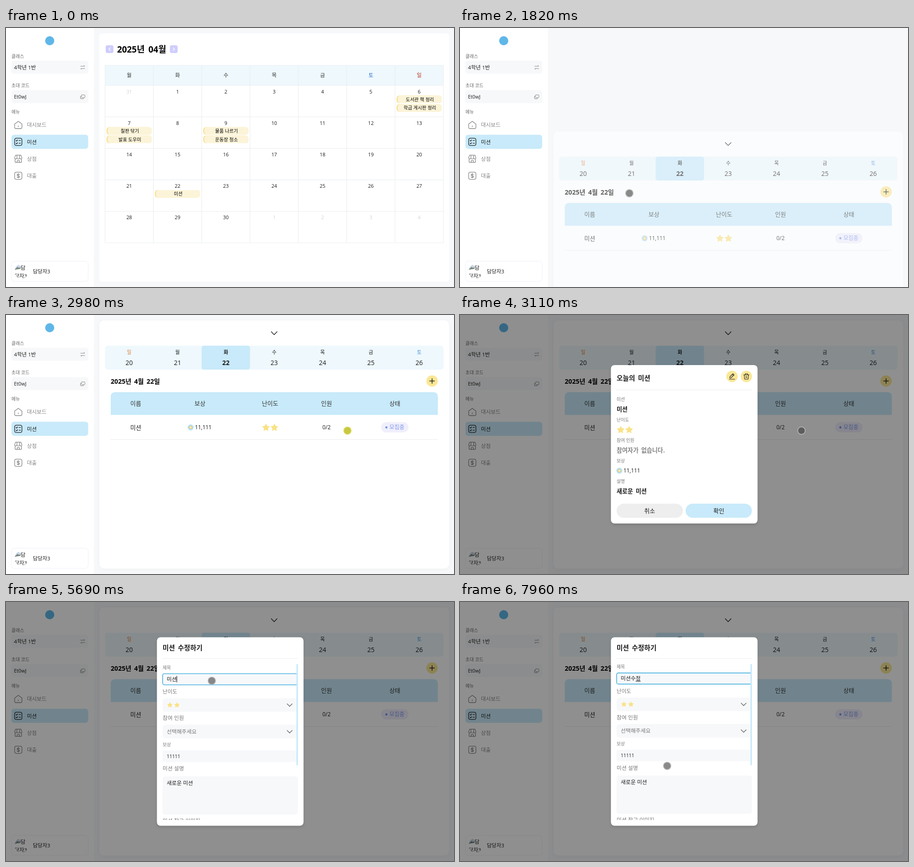
Recreate the animation shown at these times as an HTML page. Size 984 by 569 pixels, loop 8 s.

```html
<!DOCTYPE html>
<html lang="ko">
<head>
<meta charset="utf-8">
<title>미션 캘린더</title>
<style>
html, body { margin: 0; width: 100%; height: 100%; overflow: hidden; background: #f7f8fa; }
svg { display: block; width: 984px; height: 569px; }
text { font-family: 'Open Sans', 'Noto Sans CJK KR', 'Noto Sans CJK', 'Noto Sans', sans-serif; white-space: pre; }
.bold { font-weight: 700; word-spacing: .18em; }
</style>
</head>
<body>
<svg id="stage" viewBox="0 0 984 569" xmlns="http://www.w3.org/2000/svg"></svg>
<script>
const LOOP = 8000;
const SKY = '#c8eafa', PALE = '#eef8fd', FIELD = '#f7f8fa', YELLOW = '#fbe796', GRAY = '#858585', INK = '#1c1c1c';
const COL_X = 217.5, COL_W = 106.17;

// Text is placed by its vertical centre.
const text = (x, cy, str, size, { fill = INK, bold, mid } = {}) =>
  `<text x="${x}" y="${cy + size * 0.37}" font-size="${size}" fill="${fill}"` +
  `${bold ? ' class="bold"' : ''}${mid ? ' text-anchor="middle"' : ''}>${str}</text>`;
const rect = (x, y, w, h, r, fill, extra = '') =>
  `<rect x="${x}" y="${y}" width="${w}" height="${h}" rx="${r}" fill="${fill}" ${extra}/>`;
const circle = (x, y, r, fill) => `<circle cx="${x}" cy="${y}" r="${r}" fill="${fill}"/>`;
const line = (d, color = INK, width = 1.3) =>
  `<path d="${d}" fill="none" stroke="${color}" stroke-width="${width}" stroke-linecap="round" stroke-linejoin="round"/>`;
const at = (x, y, content) => `<g transform="translate(${x} ${y})">${content}</g>`;
const group = (id, content) => `<g id="${id}">${content}</g>`;

function star(x, y, r) {
  const points = Array.from({ length: 10 }, (_, i) => {
    const a = i * Math.PI / 5 - Math.PI / 2, d = i % 2 ? r * 0.5 : r;
    return `${(x + d * Math.cos(a)).toFixed(2)},${(y + d * Math.sin(a)).toFixed(2)}`;
  });
  return `<polygon points="${points.join(' ')}" fill="#f9e286" stroke="#f9e286" stroke-width="1.2" stroke-linejoin="round"/>`;
}

const coin = (x, y) => circle(x, y, 6.5, '#b5dff6') +
  at(x, y, '<path d="M0-4.3 4.3 0 0 4.3-4.3 0Z" fill="#f3cd62"/><path d="M0-2 2 0 0 2-2 0Z" fill="#fff"/>');
const chevron = (x, y, w, color) => line(`M${x - w} ${y - w / 2}l${w} ${w} ${w} ${-w}`, color, 1.4);

function sidebar() {
  const icons = [
    line('M-8-2 0-8 8-2V5Q8 8 5 8H-5Q-8 8-8 5ZM0 2V4', GRAY),
    line('M-4-8H4Q8-8 8-4V4Q8 8 4 8H-4Q-8 8-8 4V-4Q-8-8-4-8ZM-5-3l1.3 1.3L-1.5-4.2M-5 3l1.3 1.3L-1.5 1.8M1.5-3H5M1.5 3H5', INK),
    line('M-6-8H6L8-2Q7 1 4.5 0L3-1Q0 2-3-1Q-7 2-8-2ZM-7 1V6Q-7 8-5 8H5Q7 8 7 6V1M-3-8V-1M3-8V-1M-2.5 8V4H2.5V8', GRAY),
    line('M-4-8H4Q8-8 8-4V4Q8 8 4 8H-4Q-8 8-8 4V-4Q-8-8-4-8ZM2.7-2.5Q2-3.8 0-3.8T-2.7-2Q-2.7-.5 0 0T2.7 2Q2.5 3.8 0 3.8T-2.7 2.5M0-5V5', GRAY)
  ];
  const menu = ['대시보드', '미션', '상점', '대출'].map((name, i) => {
    const y = 213 + i * 37.2;
    return at(27, y, icons[i]) + text(46, y, name, 11.7, { fill: i === 1 ? INK : GRAY });
  }).join('');
  const labels = [['클래스', 62], ['초대 코드', 126], ['메뉴', 184]]
    .map(([name, y]) => text(12, y, name, 10, { fill: '#666' })).join('');
  const avatar = `<g clip-path="url(#avatar)">
    <path d="M20 520h8l4 4v3l-13 5z" fill="#c8d6e8"/><path d="M19 531l6-6 4 2 3-1v3z" fill="#77877a"/>
    ${text(32, 527, '담', 11.6)}${text(18.5, 545, '당자3', 11.6)}</g>`;
  return rect(0, 0, 193, 569, 0, '#fff') + circle(96, 28, 10, '#5fb7e8') + labels +
    rect(12, 72, 168.5, 28.5, 5, FIELD) + text(17.5, 86.5, '4학년 1반', 11.6) +
    line('M164 84H173l-2-2M173 89H164l2 2', GRAY, 1) +
    rect(12, 136.5, 168.5, 28.5, 5, FIELD) + text(17.5, 151, 'Et0wJ', 10.8) +
    line('M167 147h5q1.5 0 1.5 1.5v3q0 1.5-1.5 1.5h-5q-1.5 0-1.5-1.5v-3q0-1.5 1.5-1.5M165 149.5q-1.5 0-1.5 1.5v3q0 1.5 1.5 1.5h4q1.5 0 1.5-1.5', GRAY, 1) +
    rect(12, 234.5, 168.5, 31, 6, SKY) + menu +
    rect(12, 512.5, 168.5, 44, 6, '#fff', 'stroke="#eff0f8"') + avatar + text(59, 535, '담당자3', 11.4);
}

function calendar() {
  const rowY = i => 126 + i * 69.2;
  const missions = { 6: ['도서관 책 정리', '학급 게시판 정리'], 7: ['칠판 닦기', '발표 도우미'], 9: ['물품 나르기', '운동장 청소'], 22: ['미션'] };
  const pageButton = (x, dir) => rect(x - 8.5, 38, 17, 17, 4, '#cfcdfc') +
    line(`M${x - dir * 1.5} 43.5l${dir * 3} 3 ${-dir * 3} 3`, '#fff', 1.4);
  let out = rect(205, 12, 768.5, 545, 6, '#fff') + pageButton(227.5, -1) + pageButton(368.5, 1) +
    text(244, 47, '2025년 04월', 18.9, { bold: true, fill: '#000' }) +
    rect(COL_X, 82, COL_W * 7, 44, 0, PALE);
  let grid = '';
  for (let i = 0; i < 8; i++) grid += `M${COL_X + i * COL_W} 82V472`;
  grid += `M${COL_X} 82h${COL_W * 7}`;
  for (let i = 0; i < 6; i++) grid += `M${COL_X} ${rowY(i)}h${COL_W * 7}`;
  out += line(grid, '#ebeff1', 1.2);
  [...'월화수목금토일'].forEach((day, i) => {
    out += text(COL_X + (i + 0.5) * COL_W, 104, day, 11.5, { mid: true, fill: ['#2a6fc9', '#b8301c'][i - 5] || '#333' });
  });
  for (let i = 0; i < 35; i++) {
    const x = COL_X + (i % 7) * COL_W, y = rowY(Math.floor(i / 7));
    const inMonth = i > 0 && i < 31;
    out += text(x + COL_W / 2, y + 13.7, i === 0 ? 31 : inMonth ? i : i - 30, 10.8, { mid: true, fill: inMonth ? INK : '#d3d3d3' });
    (inMonth && missions[i] || []).forEach((name, k) => {
      const top = y + 22.5 + k * 18.8;
      out += rect(x + 3.5, top, 99, 16.5, 6, '#f8dc80') + rect(x + 5.5, top, 97, 16.5, 6, '#fcf4d9') +
        text(x + 54.5, top + 8.3, name, 10.3, { mid: true, fill: '#000' });
    });
  }
  return out;
}

function week() {
  let out = rect(205, 12, 768.5, 545, 11, '#fff', 'filter="url(#soft)"') + chevron(589, 40, 6.3, INK) +
    rect(217.5, 67.5, 743.5, 52.5, 6, PALE) + rect(429.7, 67.5, 106.3, 52.5, 5, SKY);
  [...'일월화수목금토'].forEach((day, i) => {
    const x = COL_X + (i + 0.5) * COL_W, bold = i === 2;
    out += text(x, 82, day, 10.8, { mid: true, bold, fill: { 0: '#dc7e35', 6: '#438fdf' }[i] || INK }) +
      text(x, 104.5, 20 + i, 14, { mid: true, bold });
  });
  out += text(230, 146, '2025년 4월 22일', 14.15, { bold: true, fill: '#000' }) +
    circle(935.8, 145, 12.5, YELLOW) + line('M930.5 145h10.600M935.800 139.700v10.600', INK, 1.5) +
    `<path d="M230 219.5V179.5q0-10 10-10H938.5q10 0 10 10v40z" fill="${SKY}"/>`;
  [['이름', 285], ['보상', 426], ['난이도', 580], ['인원', 704], ['상태', 854]]
    .forEach(([name, x]) => { out += text(x, 194.5, name, 13, { mid: true, fill: '#333' }); });
  return out + text(285, 247, '미션', 13, { mid: true }) + coin(405.5, 247) + text(415, 247, '11,111', 11.8) +
    star(571, 247.5, 7.8) + star(589.5, 247.5, 7.8) + text(704, 247, '0/2', 12, { mid: true }) +
    rect(824, 235.5, 60, 22.5, 11.2, '#f0effc') + circle(835.5, 247, 2.4, '#7294ea') +
    text(842, 246.5, '모집중', 12, { fill: '#7d97ea' }) + line('M230 273.5H948', '#ececee', 1);
}

const dialog = (y, h, title, titleY, ruleY) =>
  rect(331.5, y, 322, h, 8, '#fff', 'filter="url(#lift)"') +
  text(344, titleY, title, 14.7, { bold: true }) + line(`M344 ${ruleY}H641`, '#ededf0', 1);

function detail() {
  const labels = ['미션', '난이도', '참여 인원', '보상', '설명']
    .map((name, i) => text(344, 185 + i * 45, name, 9.9, { fill: '#777' })).join('');
  return dialog(110, 348, '오늘의 미션', 138.5, 164.5) + labels +
    circle(597.5, 135, 12.5, YELLOW) + circle(629, 135, 12.5, YELLOW) +
    at(597.5, 135, line('M-5 3.5l.5-3L2-6 4.5-3.5-2 3ZM.5-4.5 3-2M-6 6H6', INK, 1.1)) +
    at(629, 135, line('M-6-3.5H6M-2.5-3.5V-6H2.5V-3.5M-4.7-3.5-4 5Q-4 6-3 6H3Q4 6 4 5L4.7-3.5M-1.5 0H1.5M-1.5 2.5H1.5', INK, 1.1)) +
    text(344, 207.5, '미션', 13.1, { bold: true }) + star(353, 252.5, 7.8) + star(371.5, 252.5, 7.8) +
    text(344, 297.5, '참여자가 없습니다.', 13.1, { bold: true, fill: GRAY }) +
    coin(350, 342) + text(359, 342, '11,111', 11.9) + text(344, 387.5, '새로운 미션', 13.1, { bold: true }) +
    rect(344, 414.5, 145.5, 31, 15.5, '#eee') + rect(495.5, 414.5, 145.5, 31, 15.5, SKY) +
    text(416.5, 430, '취소', 13, { mid: true }) + text(568.5, 430, '확인', 13, { mid: true });
}

function editor() {
  const label = (y, name, size = 11.9) => text(344, y, name, size, { fill: '#777' });
  const form = label(144, '제목', 9.9) + rect(344, 157.5, 297, 24.5, 4, FIELD, 'id="title" stroke-width="1.6"') +
    text(353, 169.5, '<tspan id="typed"></tspan><tspan id="composing" text-decoration="underline"></tspan>', 11.9) +
    rect(374.7, 162.5, 1, 14, 0, '#000', 'id="caret"') +
    label(197, '난이도', 11.6) + rect(344, 211.5, 297, 29.5, 6, FIELD) + star(360, 226.5, 5.2) + star(375.5, 226.5, 5.2) +
    chevron(623, 226.5, 5.5, '#666') +
    label(255, '참여 인원') + rect(344, 269.5, 297, 30, 6, FIELD) + text(353, 284.5, '선택해주세요', 11.9, { fill: '#777' }) +
    chevron(623, 285, 5.5, '#666') +
    label(313, '보상', 9.9) + rect(344, 326, 297, 25.5, 4, FIELD) + text(353, 339, '11111', 10.4) +
    label(366, '미션 설명') + rect(344, 383, 297, 84, 5, FIELD) + text(353, 397.5, '새로운 미션', 11.9) +
    label(480.5, '미션 참고 이미지');
  return dialog(77.5, 414, '미션 수정하기', 101, 124) +
    `<g clip-path="url(#form-box)">${group('form', form)}</g>` + rect(638, 136.5, 3.2, 222, 0, SKY);
}

const stage = document.getElementById('stage');
stage.innerHTML = `<defs>
  <clipPath id="avatar"><circle cx="34.5" cy="534.5" r="15.8"/></clipPath>
  <clipPath id="form-box"><rect x="343" y="136" width="298" height="343"/></clipPath>
  <filter id="soft"><feDropShadow dx="0" dy="2" stdDeviation="4" flood-opacity=".03"/></filter>
  <filter id="lift"><feDropShadow dx="0" dy="3" stdDeviation="3" flood-opacity=".14"/></filter></defs>` +
  rect(0, 0, 984, 569, 0, '#f7f8fa') + group('calendar', calendar()) + group('week', week()) + sidebar() +
  rect(0, 0, 984, 569, 0, '#000', 'id="shade" opacity=".44"') +
  group('detail', detail()) + group('editor', editor()) +
  '<circle id="cursor" r="8.2" stroke-width="1.8"/>';

const $ = id => document.getElementById(id);
const show = (id, on) => $(id).setAttribute('display', on ? 'inline' : 'none');
const within = (t, a, b) => t >= a && t < b;

// Progress from 0 to 1, held in n equal steps.
const stepped = (t, a, b, n) => Math.min(1, Math.max(0, Math.floor((t - a) / (b - a) * n + 1e-6) / n));

const moves = [
  { start: 260, end: 960, steps: 10, from: [912, 559], bend: [560, 545], to: [372, 363] },
  { start: 2440, end: 2910, steps: 6, from: [372, 363], bend: [580, 355], to: [750, 254] },
  { start: 3510, end: 4190, steps: 9, from: [750, 254], bend: [715, 268], to: [601, 138] },
  { start: 4920, end: 5550, steps: 9, from: [601, 138], bend: [510, 235], to: [452, 173] },
  { start: 6220, end: 6290, steps: 1, from: [452, 173], bend: [452, 176], to: [452, 179] },
  { start: 7750, end: 7960, steps: 3, from: [452, 179], bend: [454, 270], to: [455, 360] }
];
const clicks = [[1620, 1680], [2980, 3110], [4520, 4590], [5620, 5690]];
const syllables = [['', 'ㅅ'], ['', '수'], ['', '숮'], ['수', '저'], ['수', '정']];

function drawCursor(t) {
  const move = moves.filter(m => t >= m.start).pop();
  show('cursor', move);
  if (!move) return;
  const u = 1 - (1 - stepped(t, move.start, move.end, move.steps)) ** 2;
  const [x, y] = [0, 1].map(k => (1 - u) ** 2 * move.from[k] + 2 * u * (1 - u) * move.bend[k] + u * u * move.to[k]);
  const pressed = clicks.some(([a, b]) => within(t, a, b));
  const cursor = $('cursor');
  cursor.setAttribute('cx', x);
  cursor.setAttribute('cy', y);
  cursor.setAttribute('fill', pressed ? 'rgba(190,190,30,.85)' : 'rgba(60,60,60,.6)');
  cursor.setAttribute('stroke', pressed ? 'rgba(222,222,110,.85)' : 'rgba(185,185,185,.9)');
}

function render(t) {
  show('calendar', t < 1680);
  show('week', t >= 1680);
  const left = (1 - stepped(t, 1680, 2380, 10)) ** 4.17;
  $('week').setAttribute('transform', `translate(0 ${545 * left})`);
  $('week').setAttribute('opacity', 1 - left);

  show('shade', t >= 3110);
  show('detail', within(t, 3110, 4590));
  show('editor', t >= 4590);
  $('title').setAttribute('stroke', t >= 5690 ? '#47b1de' : 'none');
  show('caret', within(t, 5690, 6220) || within(t, 6750, 6844));
  const [done, current] = t < 6844 ? ['', ''] : syllables[Math.min(4, Math.floor((t - 6844) / 94))];
  $('typed').textContent = '미션' + done;
  $('composing').textContent = current;
  $('form').setAttribute('transform', `translate(0 ${t >= 7890 ? -1.6 : 0})`);
  drawCursor(t);
}

const began = performance.now();
function tick() {
  render((performance.now() - began) % LOOP);
  requestAnimationFrame(tick);
}
tick();
</script>
</body>
</html>
```
